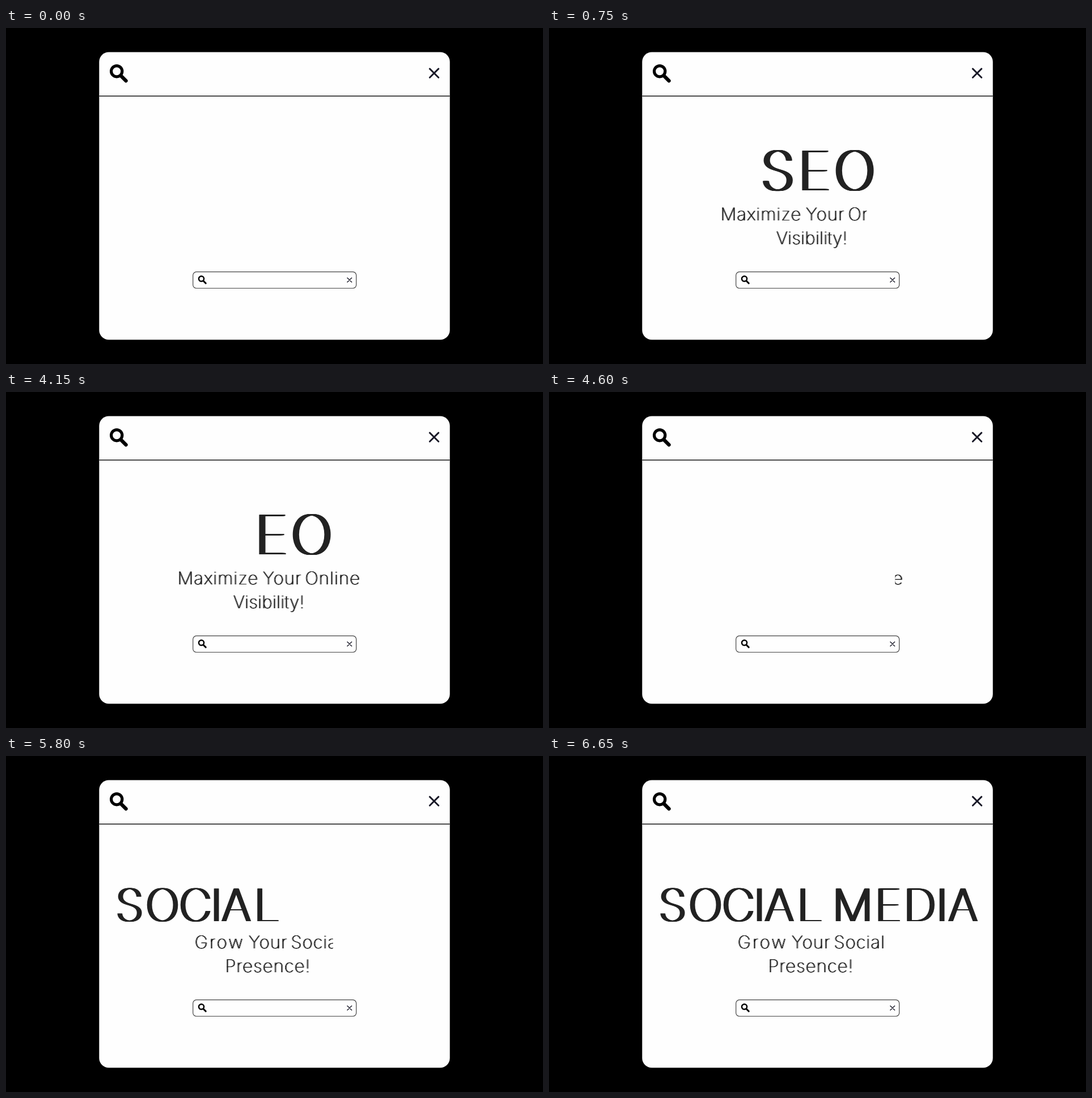
An HTML page that plays this animation: 947 px wide and 592 px high, repeating every 8000 ms.

```html
<!DOCTYPE html>
<html lang="en">
<head>
<meta charset="utf-8">
<title>Search card</title>
<style>
  html, body { margin: 0; width: 100%; height: 100%; overflow: hidden; background: #000; }
  svg { display: block; width: 100%; height: 100%; }
  text {
    font-family: Inter, Lato, sans-serif;
    font-weight: 100;
    font-optical-sizing: none;
    text-rendering: geometricPrecision;
    fill: #222;
  }
  /* Sideways shadows thicken stems only, which gives a high-contrast face. */
  .title { text-anchor: middle; }
  .big { filter: drop-shadow(1px 0 #222) drop-shadow(2px 0 #222) drop-shadow(4px 0 #222) drop-shadow(2px 0 #222); }
  .wide { filter: drop-shadow(1px 0 #222) drop-shadow(2px 0 #222) drop-shadow(4px 0 #222); }
  .tagline { font-size: 31px; filter: drop-shadow(1px 0 #222) drop-shadow(1px 0 #222); }
</style>
</head>
<body>
<svg id="stage" viewBox="0 0 947 592">
  <defs>
    <g id="lens" fill="none" stroke="#000">
      <circle cx="12.2" cy="12.2" r="9.6" stroke-width="5.2"/>
      <path d="M20 20.5L28.5 29" stroke-width="6.4" stroke-linecap="round"/>
    </g>
    <path id="cross" d="M-7.7-7.7L7.7 7.7M7.7-7.7L-7.7 7.7" fill="none" stroke="#1a1a28" stroke-width="2.9" stroke-linecap="round"/>
  </defs>
  <rect width="947" height="592"/>
  <rect x="164.3" y="42.4" width="618.4" height="506.8" rx="17" fill="#fefefe"/>
  <path d="M164.3 119.8H782.7" stroke="#333" stroke-width="1.8"/>
  <use href="#lens" x="183" y="64"/>
  <use href="#cross" x="755" y="79.6"/>
  <rect x="329.7" y="429.7" width="288" height="28.8" rx="6" fill="none" stroke="#444" stroke-width="1.2"/>
  <use href="#lens" transform="translate(338.7 436) scale(.475)"/>
  <use href="#cross" transform="translate(605.8 444) scale(.5)"/>
</svg>
<script>
const LOOP = 8000, STEP = 50;
const WIPE = { left: 300, width: 325, time: 830, delay: 170 };
const stage = document.getElementById('stage');

const pages = [
  {
    title: 'SEO', style: 'big', size: 96, base: 286, shift: -4.5,
    xs: [403.5, 468, 539],
    words: [['Maximize', 301.5, 339], ['Your', 452, 339], ['Online', 526.5, 339], ['Visibility!', 400, 381, .5]],
    start: 120, leave: 4150
  },
  {
    title: 'SOCIAL MEDIA', style: 'wide', size: 79, base: 291, shift: -3.5,
    xs: [218, 276, 334, 371, 406, 460, 490, 535.5, 598, 654, 693, 730],
    words: [['Grow', 332, 339, 3.2], ['Your', 427, 339], ['Social', 501.5, 339], ['Presence!', 385.5, 381]],
    start: 5120, leave: Infinity
  }
];

function add(parent, tag, attrs, content = '') {
  const el = document.createElementNS('http://www.w3.org/2000/svg', tag);
  for (const key in attrs) el.setAttribute(key, attrs[key]);
  el.textContent = content;
  parent.append(el);
  return el;
}

function build(page, n) {
  const title = add(add(stage, 'g', { class: 'title ' + page.style }), 'text',
    { 'font-size': page.size, y: page.base });
  page.letters = [...page.title].map((ch, i) =>
    add(title, 'tspan', { x: page.xs[i] + page.shift }, ch));

  const clip = add(stage, 'clipPath', { id: 'wipe' + n });
  page.clip = add(clip, 'rect', { y: 305, height: 95 });
  const lines = add(add(stage, 'g', { 'clip-path': `url(#wipe${n})` }), 'g', { class: 'tagline' });
  for (const [word, x, y, space = 1.2] of page.words)
    add(lines, 'text', { x, y, style: `letter-spacing:${space}px` }, word);
}

const easeOut = u => 1 - (1 - Math.min(1, Math.max(0, u))) ** 2;
const edge = u => WIPE.left + WIPE.width * easeOut(u);

function draw(time) {
  const t = Math.floor(time / STEP) * STEP;
  for (const page of pages) {
    page.letters.forEach((el, i) => {
      const shown = t >= page.start + 110 * i && t < page.leave + 100 * i;
      el.setAttribute('visibility', shown ? 'visible' : 'hidden');
    });
    const right = edge((t - page.start - WIPE.delay) / WIPE.time);
    const left = edge((t - page.leave - 80) / 470);
    page.clip.setAttribute('x', left);
    page.clip.setAttribute('width', Math.max(0, right - left));
  }
}

pages.forEach(build);
const began = performance.now();
function tick() {
  draw((performance.now() - began) % LOOP);
  requestAnimationFrame(tick);
}
tick();
</script>
</body>
</html>
```
